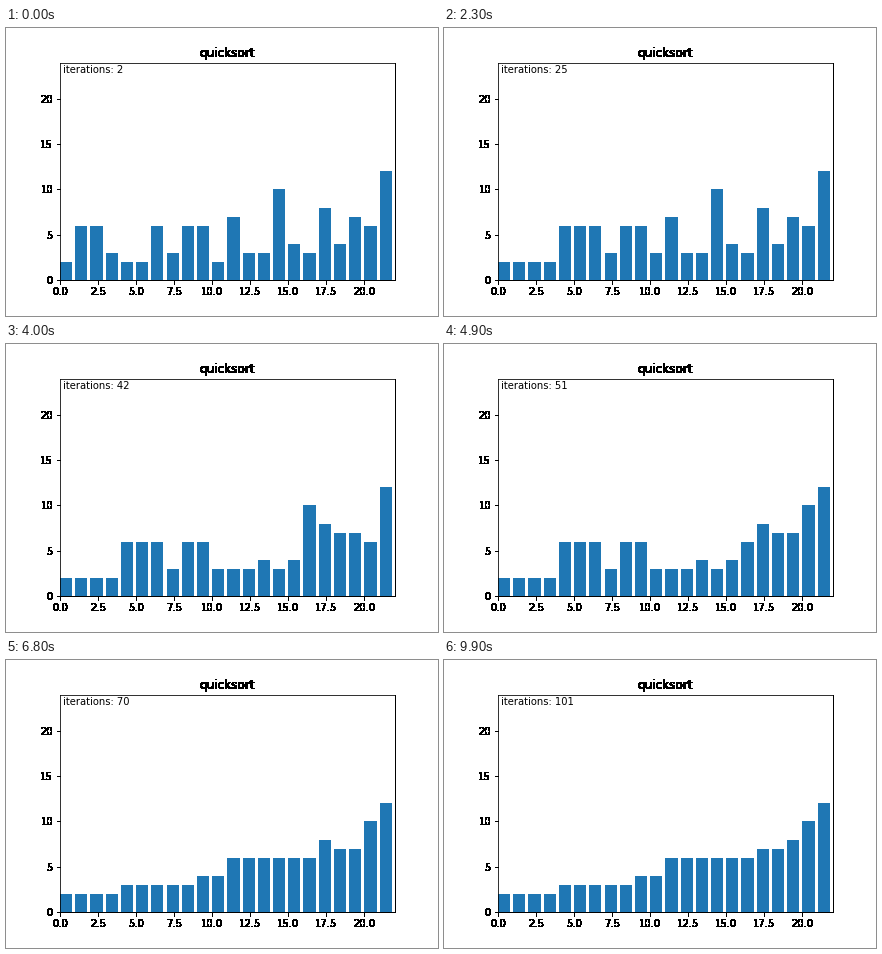
These frames come from a looping animation (432x288 px, 10000 ms). A matplotlib script:

```python
import matplotlib.pyplot as plt
import numpy as np
from matplotlib.animation import FuncAnimation

DATA = [2, 6, 6, 3, 2, 2, 6, 3, 6, 6, 2, 7, 3, 3, 10, 4, 3, 8, 4, 7, 6, 12]
N = len(DATA)


def quicksort(a, lo, hi):
    """Sort a[lo..hi] in place, yielding a copy after every step."""
    if lo >= hi:
        return
    pivot, j = a[lo], lo
    for i in range(lo + 1, hi + 1):
        if a[i] <= pivot:
            j += 1
            a[j], a[i] = a[i], a[j]
        yield a[:]
    a[lo], a[j] = a[j], a[lo]
    yield a[:]
    yield from quicksort(a, lo, j - 1)
    yield from quicksort(a, j + 1, hi)


def solid(img, dpi):
    """Turn every touched pixel fully black, for hard-edged labels."""
    out = np.zeros_like(img)
    out[..., 3] = img[..., 3] > 0
    return out, 0, 0


steps = list(quicksort(DATA[:], 0, N - 1))

fig = plt.figure(figsize=(6, 4), dpi=72, facecolor="white")
fig.subplots_adjust(left=0.125, right=0.9, bottom=0.125, top=0.88)
ax = fig.add_subplot()
ax.set_title("quicksort")
bars = ax.bar(range(N), DATA, align="edge")
ax.set_xlim(0, N)
ax.set_ylim(0, int(1.1 * N))
label = ax.text(0.01, 0.95, "", transform=ax.transAxes)

for artist in (ax.title, ax.xaxis, ax.yaxis,
               ax.spines["right"], ax.spines["bottom"]):
    artist.set_agg_filter(solid)


def update(k):
    # The first step is already done when the loop starts.
    for bar, value in zip(bars, steps[k + 1]):
        bar.set_height(value)
    label.set_text(f"iterations: {k + 2}")
    return [*bars, label]


anim = FuncAnimation(fig, update, frames=len(steps) - 1, interval=100,
                     repeat=True, repeat_delay=0, blit=False)
plt.show()
```
